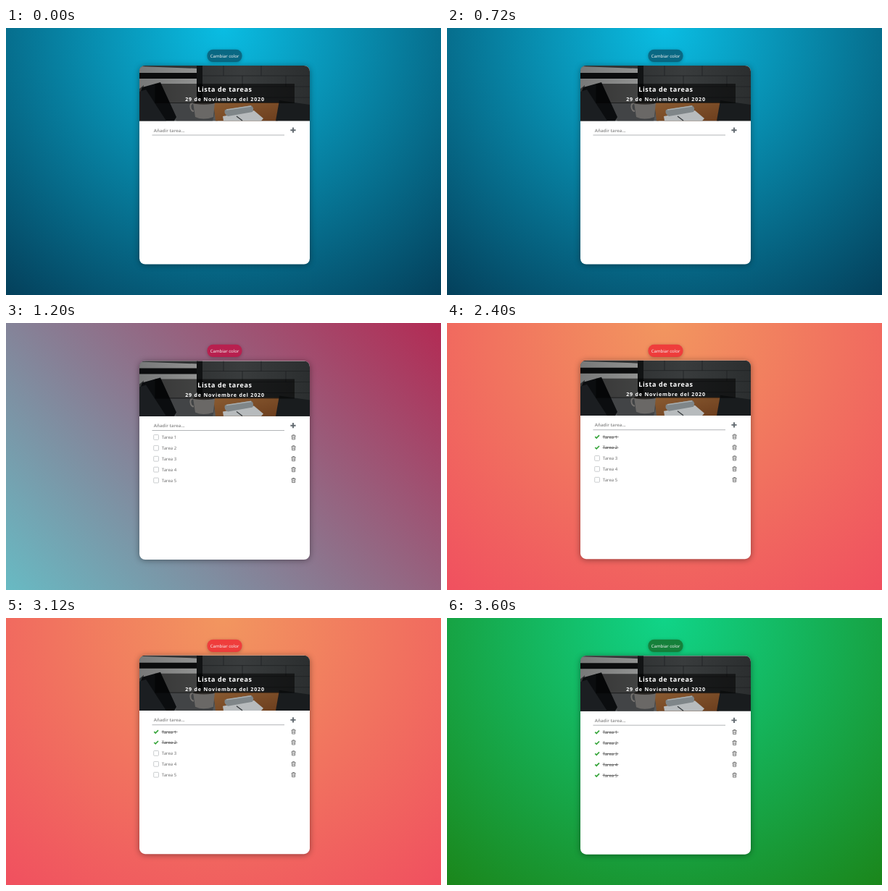
An HTML page that plays this animation: 600 px wide and 369 px high, repeating every 4.8 s.

```html
<!DOCTYPE html>
<html lang="es">
<head>
<meta charset="utf-8">
<title>Lista de tareas</title>
<style>
html, body { margin: 0; width: 100%; height: 100%; overflow: hidden; }
svg { display: block; width: 100%; height: 100%; }
text { font-family: "Noto Sans", "Open Sans", sans-serif; font-size: 6px; text-rendering: geometricPrecision; }
.head { fill: #fff; font-weight: 700; text-anchor: middle; }
.card { filter: drop-shadow(0 1px 4px rgba(0, 0, 0, .4)); }
.pill { filter: drop-shadow(0 1px 2px rgba(0, 0, 0, .25)); }
</style>
</head>
<body>
<svg viewBox="0 0 600 369" preserveAspectRatio="none">
  <defs>
    <clipPath id="round"><rect x="184" y="52" width="235" height="274.5" rx="8"/></clipPath>
    <linearGradient id="pane" x1="0" y1="0" x2="1" y2="0">
      <stop offset="0" stop-color="#777878"/><stop offset="1" stop-color="#929392"/>
    </linearGradient>
    <linearGradient id="wall" x1="0" y1="0" x2="1" y2="0">
      <stop offset="0" stop-color="#252728"/><stop offset=".6" stop-color="#393c3d"/><stop offset="1" stop-color="#2b2e2f"/>
    </linearGradient>
    <linearGradient id="wood" x1="0" y1="0" x2="1" y2="1">
      <stop offset="0" stop-color="#8a5b31"/><stop offset="1" stop-color="#6b3d1d"/>
    </linearGradient>
    <g id="bin" fill="none" stroke="#666" stroke-width=".8">
      <path d="M-3-2H3M-1.2-2.1V-3.2H1.2V-2.1M-2.3-2L-2 3H2L2.3-2M-.7-.6V1.8M.7-.6V1.8"/>
    </g>
    <rect id="box" x="-3.4" y="-3.4" width="6.8" height="6.8" rx=".8" fill="#fff" stroke="#c4c8ca" stroke-width=".9"/>
    <path id="tick" d="M-2.8 0L-.9 1.9L2.9-2" fill="none" stroke="#36a53a" stroke-width="1.7"/>
  </defs>

  <rect class="pill" id="pill" x="277.5" y="29.8" width="48" height="17.2" rx="8"/>
  <text x="301.6" y="40.7" text-anchor="middle" fill="#f4f4f4">Cambiar color</text>

  <g id="panel">
    <rect class="card" x="184" y="52" width="235" height="274.5" rx="8" fill="#fff"/>
    <g clip-path="url(#round)">
      <rect x="184" y="52" width="235" height="76.3" fill="url(#wall)"/>
      <path d="M270 66H419M270 81H419M270 96H419M300 52V66M352 52V66M326 66V81M386 66V81" stroke="#202324" stroke-width=".8"/>
      <path d="M184 52H265V128H184Z" fill="url(#pane)"/>
      <path d="M184 52H265V56L184 53Z" fill="#303233"/>
      <path d="M184 62H265V70H184Z" fill="#0b0c0d"/>
      <path d="M263 52H271V105H263Z" fill="#111314"/>
      <path d="M184 90L225 103H292V128.3H184Z" fill="#55585a"/>
      <path d="M222 103H292L285 128.3H235Z" fill="#424446"/>
      <path d="M184 84L190 79L184 128.3Z" fill="#333536"/>
      <path d="M188 82L213 75L235 123L232 128.3H184V92Z" fill="#0b0d0f"/>
      <path d="M184 88L193 85L221 128.3H184Z" fill="#1b1e21"/>
      <path d="M286 103H380L375 128.3H289Z" fill="url(#wood)"/>
      <path d="M377 100L419 106V128.3H372Z" fill="#191c1e"/>
      <path d="M258 104C253 103 253 114 259 115" fill="none" stroke="#74716e" stroke-width="2"/>
      <path d="M258 103H288L286 123Q272 128 261 123Z" fill="#6a6866"/>
      <ellipse cx="273" cy="103.5" rx="15" ry="2.2" fill="#34302d"/>
      <path d="M299 122L342 114L355 125L352 128.3H300Z" fill="#b7bbbd"/>
      <path d="M302 113L338 107Q343 110 340 116L306 122Q300 119 302 113Z" fill="#7f8689"/>
      <path d="M304 113L338 108" stroke="#a7adaf" stroke-width="1.5"/>
      <path d="M318 122L326 128" stroke="#33373a" stroke-width="1.2"/>
      <rect x="205.5" y="77" width="192.5" height="27" fill="#000" opacity=".55"/>
    </g>
    <text class="head" x="301.9" y="88" style="font-size:9px;letter-spacing:.64px">Lista de tareas</text>
    <text class="head" x="302" y="101" style="font-size:7.1px;letter-spacing:.8px">29 de Noviembre del 2020</text>

    <text x="203.8" y="143.6" fill="#999" font-weight="600">Añadir tarea...</text>
    <path d="M201.5 148H384" stroke="#aaadaf" stroke-width=".9"/>
    <path d="M392.4 141.2H399.6M396 137.6V144.8" stroke="#626a70" stroke-width="1.9"/>
    <g id="list"></g>
  </g>
</svg>
<script>
const STEP = 1200;
const glow = (a, b) => `radial-gradient(circle at 50% 0, ${a}, ${b})`;
const scenes = [
  { back: glow('#0abde3', '#04405b'), pill: '#096883', rows: 0, done: 0, dy: 0 },
  { back: 'linear-gradient(45deg, #68bac3, #b32b54)', pill: '#b8204f', rows: 5, done: 0, dy: .5 },
  { back: glow('#f2965f', '#f0505f'), pill: '#ef3d3c', rows: 5, done: 2, dy: -.3 },
  { back: glow('#10d488', '#1b861b'), pill: '#15803a', rows: 5, done: 5, dy: .2 }
];
const el = id => document.getElementById(id);

function row(i, done) {
  const y = 157.4 + 14.9 * i;
  const strike = done ? '<path d="M214.5 .3H236.5" stroke="#444" stroke-width=".7"/>' : '';
  return `<g transform="translate(0 ${y})">
    <use href="#${done ? 'tick' : 'box'}" x="207.1"/>
    <text x="214.8" y="2.4" fill="${done ? '#555' : '#707070'}">Tarea ${i + 1}</text>${strike}
    <use href="#bin" x="396.6"/></g>`;
}

let shown = -1;
function draw(now) {
  const n = Math.floor(now / STEP) % scenes.length;
  if (n !== shown) {
    const s = scenes[shown = n];
    document.body.style.background = s.back;
    el('pill').setAttribute('fill', s.pill);
    el('panel').setAttribute('transform', `translate(0 ${s.dy})`);
    el('list').innerHTML = Array.from({ length: s.rows }, (_, i) => row(i, i < s.done)).join('');
  }
  requestAnimationFrame(() => draw(performance.now() - start));
}
const start = performance.now();
draw(0);
</script>
</body>
</html>
```
